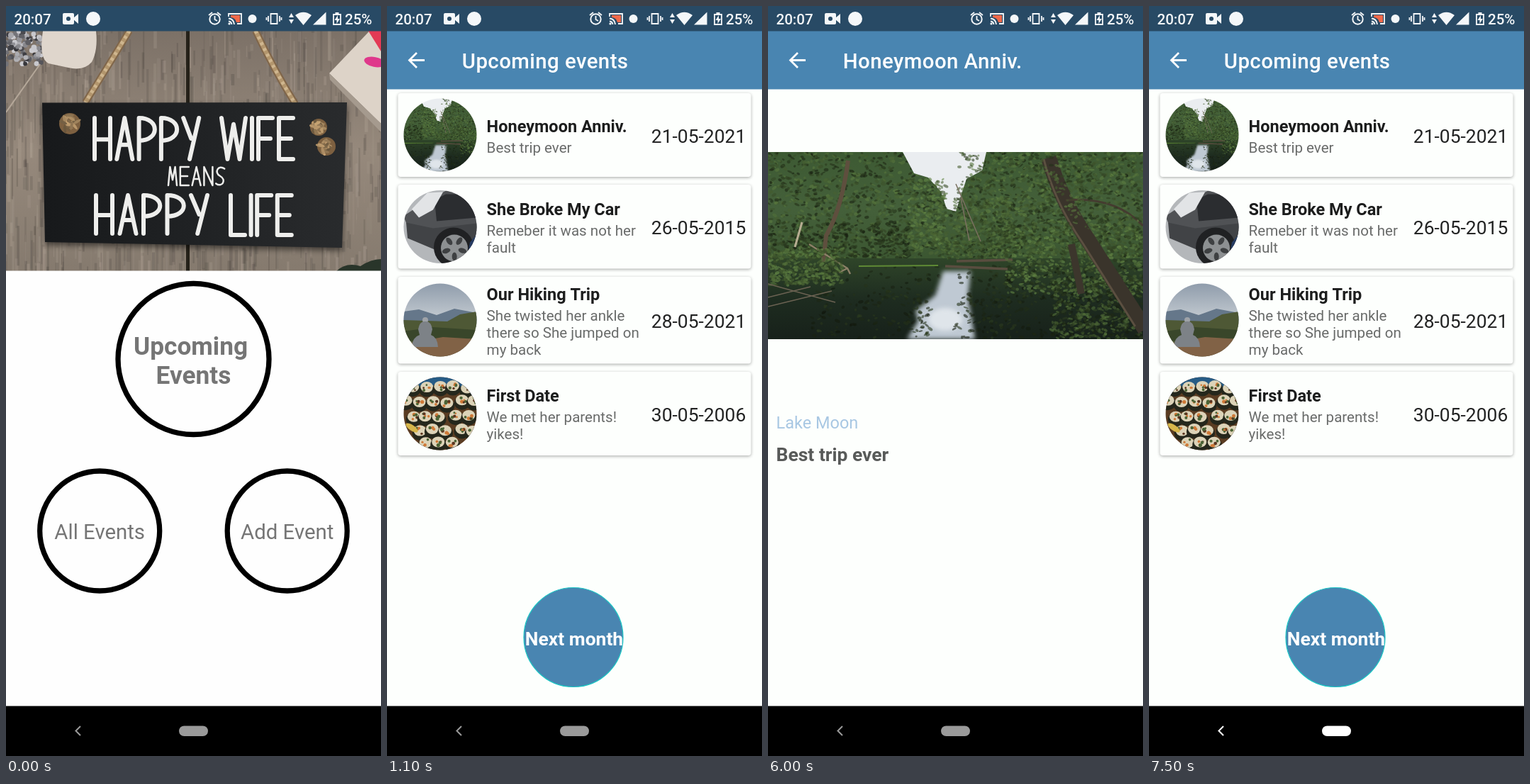
An HTML page with a canvas for the animation above (8 s loop, 529x1058 px).

```html
<!DOCTYPE html>
<html lang="en">
<head>
<meta charset="utf-8">
<title>Event reminder app</title>
<style>
  html, body { margin: 0; width: 100%; height: 100%; overflow: hidden; background: #fdfffd; }
  canvas { display: block; width: 529px; height: 1058px; }
</style>
</head>
<body>
<canvas id="stage" width="529" height="1058"></canvas>
<script>
const W = 529, H = 1058, LOOP = 8000, TAU = Math.PI * 2;
const DP = W / 360;
const BLUE = '#4985b1', PAPER = '#fdfffd';
const stage = document.getElementById('stage').getContext('2d');

function layer(w, h, draw) {
  const canvas = document.createElement('canvas');
  canvas.width = w;
  canvas.height = h;
  draw(canvas.getContext('2d'));
  return canvas;
}

function seeded(seed) {
  return (lo = 0, hi = 1) => {
    seed = (seed * 16807) % 2147483647;
    return lo + (hi - lo) * seed / 2147483647;
  };
}

function text(c, str, x, y, sp, color, weight = 400, align = 'left') {
  c.font = `${weight} ${sp * DP}px Roboto, sans-serif`;
  c.textAlign = align;
  c.fillStyle = color;
  c.fillText(str, x, y);
}

function rect(c, x, y, w, h, color) {
  c.fillStyle = color;
  c.fillRect(x, y, w, h);
}

function round(c, x, y, w, h, r, color) {
  c.fillStyle = color;
  c.beginPath();
  c.roundRect(x, y, w, h, r);
  c.fill();
}

function oval(c, x, y, rx, ry, color, turn = 0) {
  c.fillStyle = color;
  c.beginPath();
  c.ellipse(x, y, rx, ry, turn, 0, TAU);
  c.fill();
}

const disc = (c, x, y, r, color) => oval(c, x, y, r, r, color);

function ring(c, x, y, r, width, color) {
  c.lineWidth = width;
  c.strokeStyle = color;
  c.beginPath();
  c.arc(x, y, r, 0, TAU);
  c.stroke();
}

function shape(c, d, color) {
  c.fillStyle = color;
  c.fill(new Path2D(d));
}

function line(c, d, width, color) {
  c.lineWidth = width;
  c.strokeStyle = color;
  c.stroke(new Path2D(d));
}

function gradient(c, y0, y1, ...colors) {
  const g = c.createLinearGradient(0, y0, 0, y1);
  colors.forEach((color, i) => g.addColorStop(i / (colors.length - 1), color));
  return g;
}

// Brush lettering on the slate, each glyph in a unit box
const GLYPHS = {
  H: 'M0 0V1M1 0V1M0 .52H1', A: 'M0 1L.5 0L1 1M.2 .65H.8', P: 'M0 1V0C1.35 0 1.35 .55 0 .55',
  Y: 'M0 0L.5 .5M1 0L.4 1', W: 'M0 0L.25 1L.5 .15L.75 1L1 0', I: 'M0 0V1',
  F: 'M1 0H0V1M0 .5H.85', E: 'M1 0H0V1H1M0 .5H.85', L: 'M0 0V1H1',
  M: 'M0 1L.2 0L.5 .7L.8 0L1 1', N: 'M0 1V0L1 1V0', S: 'M1 .1C.3-.15-.3 .3 .5 .5S.7 1.15 0 .9'
};

function lettering(c, word, x, y, w, h, gap, width) {
  c.lineCap = c.lineJoin = 'round';
  for (const ch of word) {
    const cell = w * ({ W: 1.7, I: 0 }[ch] ?? 1);
    const path = new Path2D();
    path.addPath(new Path2D(GLYPHS[ch]), new DOMMatrix([cell || 1, 0, 0, h, x, y]));
    c.lineWidth = width;
    c.strokeStyle = '#eeeeec';
    c.stroke(path);
    x += cell + gap;
  }
}

function rope(c, d) {
  line(c, d, 10, '#80664a');
  line(c, d, 6, '#b3966d');
  c.setLineDash([4, 5]);
  line(c, d, 5, '#cfb68f');
  c.setLineDash([]);
}

function knot(c, x, y, r, rnd) {
  disc(c, x, y, r, '#7d6040');
  for (let i = 0; i < 22; i++) {
    const a = rnd(0, TAU), d = rnd(0, r * .8), tone = rnd(105, 205);
    oval(c, x + Math.cos(a) * d, y + Math.sin(a) * d, r * .4, 2, `rgb(${tone},${tone * .82},${tone * .58})`, a * 2);
  }
}

function signPhoto(c) {
  const rnd = seeded(11);
  rect(c, 0, 35, W, 339, gradient(c, 35, 374, '#7c7167', '#96897c', '#857a6e'));
  for (let i = 0; i < 900; i++) {
    const tone = rnd() < .5 ? rnd(45, 90) : rnd(150, 205);
    rect(c, rnd(-10, W), rnd(20, 370), rnd(1, 5), rnd(8, 70), `rgba(${tone},${tone * .93},${tone * .86},.2)`);
  }
  rect(c, 254, 35, 5, 339, '#252119');

  for (let i = 0; i < 120; i++) {
    const tone = rnd(50, 210);
    disc(c, rnd(-4, 50), rnd(30, 82), rnd(2, 4), `rgb(${tone},${tone},${tone + 5})`);
  }
  shape(c, 'M52 35H127Q130 62 121 79Q110 92 88 87L60 81Q46 74 52 35Z', '#dfd6cc');
  line(c, 'M48 82L0 150', 2, '#b5a89a');
  shape(c, 'M456 95L513 35H529V166Z', '#ddd3c8');
  shape(c, 'M456 95L529 166V178L457 104Z', '#a59a8e');
  shape(c, 'M511 35H529V64Z', '#e33a55');
  oval(c, 520, 79, 15, 7, '#df388b', .2);

  rope(c, 'M174 35Q150 75 112 136');
  rope(c, 'M352 35Q378 90 408 138');
  const slate = c.createLinearGradient(51, 0, 481, 0);
  slate.addColorStop(0, '#17191b');
  slate.addColorStop(1, '#292b2d');
  c.save();
  c.shadowColor = '#0008';
  c.shadowBlur = 8;
  c.shadowOffsetY = 4;
  shape(c, 'M51 136.500L481 136L474 341L55 333Z', slate);
  c.restore();
  knot(c, 90, 166, 15, rnd);
  knot(c, 441, 171, 12, rnd);
  knot(c, 452, 198, 13, rnd);

  lettering(c, 'HAPPY', 125, 158, 22, 58, 9.3, 6);
  lettering(c, 'WIFE', 304, 158, 20, 58, 9, 6);
  lettering(c, 'MEANS', 229, 227, 12, 26, 4.8, 2.5);
  lettering(c, 'HAPPY', 127, 267, 23, 54, 10.5, 6);
  lettering(c, 'LIFE', 317, 267, 20, 56, 8.6, 6);
  shape(c, 'M466 374Q480 361 500 367Q515 357 529 357V374Z', '#29352a');
}

const lake = layer(W, 264, c => {
  const rnd = seeded(5);
  const leaves = (n, x0, x1, y0, y1, dark, light, size = 4) => {
    for (let i = 0; i < n; i++) {
      const g = rnd(dark, light);
      oval(c, rnd(x0, x1), rnd(y0, y1), rnd(1.5, size), rnd(1, size * .6),
        `rgba(${g * .74},${g},${g * .52},.6)`, rnd(-.7, .7));
    }
  };
  // Woods and sky
  rect(c, 0, 0, W, 160, gradient(c, 0, 160, '#3d5a33', '#44603a', '#3a5530'));
  leaves(2400, 0, W, 0, 150, 28, 125);
  shape(c, 'M190 0H308L302 26L280 38L272 62L265 84L252 80L244 56L226 36L206 30Z', '#eaedf0');
  leaves(260, 198, 252, 38, 135, 70, 140);
  leaves(70, 268, 320, 0, 60, 50, 120);
  leaves(260, 262, 345, 65, 135, 60, 130);
  leaves(260, 0, 200, 100, 150, 22, 75);

  // Water with the mirrored trees and sky
  rect(c, 0, 150, W, 114, gradient(c, 150, 264, '#2f4529', '#1e2c20', '#17211a'));
  leaves(500, 60, W, 160, 264, 22, 62);
  c.save();
  c.filter = 'blur(3px)';
  shape(c, 'M247 168L286 168L282 205L292 264H196L212 238L208 224L236 202Z', '#bfc9d3');
  oval(c, 250, 236, 24, 16, '#dfe5ea');
  c.restore();
  leaves(90, 262, 345, 168, 262, 25, 60);
  leaves(40, 192, 230, 205, 262, 25, 60);

  line(c, 'M113 12Q104 80 82 118L78 155', 6, '#5e4f3e');
  line(c, 'M48 99L38 134', 3, '#b7ad92');
  line(c, 'M58 130L112 164L116 172M112 164L100 170', 2.5, '#8c8068');
  line(c, 'M128 161L240 160', 2, '#5f8a35');
  line(c, 'M250 161L338 165M266 154L345 152', 3.5, '#594d3f');
  leaves(160, 245, 340, 126, 150, 60, 120, 3);
  line(c, 'M265 45L300 126M272 65L284 125', 1.5, '#7a7060');
  leaves(450, 0, 105, 136, 188, 60, 140);
  line(c, 'M0 186Q50 200 95 212M0 218L90 196M0 205L60 190', 1.5, '#6b6252');

  // Near bank and the leaning trunk
  leaves(900, 335, W, 105, 200, 50, 145);
  leaves(500, 400, W, 180, 264, 30, 125);
  line(c, 'M428 130L442 200', 10, '#3c362c');
  line(c, 'M396 8Q412 66 452 125L532 250', 22, '#3a342b');
  line(c, 'M389 10Q404 70 443 127L518 246', 3, '#5b4f40');
  line(c, 'M420 68Q490 62 529 104', 3, '#453c30');
  leaves(500, 320, W, 0, 110, 45, 135);
});

// Round pictures, drawn around their own centre
function lakeThumb(c) {
  c.drawImage(lake, 132, 0, 264, 264, -52, -52, 104, 104);
}

function carThumb(c) {
  rect(c, -52, -52, 104, 104, '#b4b7ba');
  shape(c, 'M-52 -15L-20 -36L10 -52H52V18L-10 26L-40 12Z', '#505255');
  shape(c, 'M-8 -38L8 -46H52V-13L-5 -8Z', '#2b2d30');
  shape(c, 'M-40 -25L-18 -48L4 -49L-10 -24L-30 -13Z', '#e2e4e6');
  shape(c, 'M-48 -6L-10 2L52 -5V26L-8 32L-46 16Z', '#414346');
  disc(c, 19, 29, 28, '#202123');
  disc(c, 20, 30, 19, '#8d9092');
  for (let i = 0; i < 5; i++) {
    const a = i * TAU / 5 + .3;
    oval(c, 20 + Math.cos(a) * 12, 30 + Math.sin(a) * 12, 6, 3.5, '#3e4042', a);
  }
  shape(c, 'M42 22L52 10V52H36Z', '#263c63');
}

function hikeThumb(c) {
  rect(c, -52, -52, 104, 52, gradient(c, -52, 0, '#8f9cab', '#c5ccd2'));
  shape(c, 'M-52 -12L-30 -15L-5 -7L20 -16L52 -10V10H-52Z', '#65778a');
  shape(c, 'M-52 0L10 2L28 -8L52 -12V52H-52Z', '#4e5835');
  shape(c, 'M-52 16L-10 10L52 14V26L-52 30Z', '#39462a');
  shape(c, 'M-52 34L4 24L52 27V52H-52Z', '#816246');
  disc(c, -21, 0, 4, '#9fa3a8');
  shape(c, 'M-31 13Q-29 1 -21 2Q-13 1 -11 13L-13 21Q-4 24 -3 38H-40Q-39 24 -29 21Z', '#7d8287');
}

function sushiThumb(c) {
  const rnd = seeded(23);
  rect(c, -52, -52, 104, 104, '#5a3c22');
  shape(c, 'M-52 -52H52V-20Q0 -55 -52 -20Z', '#275c86');
  for (let row = -2; row <= 2; row++) {
    for (let col = -3; col <= 3; col++) {
      const x = col * 19 + (row & 1) * 9 + rnd(-3, 3), y = row * 20 + 3 + rnd(-3, 3);
      if (Math.hypot(x, y) > 54) continue;
      oval(c, x, y + 3, 11, 10, '#25271c');
      oval(c, x, y - 1, 9, 7.5, '#dcd3b8');
      for (let i = 0; i < 5; i++)
        disc(c, x + rnd(-5, 5), y + rnd(-5, 4), rnd(1.2, 2.6), ['#cf7937', '#4b6335', '#5b3520'][i % 3]);
    }
  }
  oval(c, -40, 20, 10, 4, '#d6b64b', .6);
}

const EVENTS = [
  { top: 123, height: 118, middle: 182, title: 177.5, name: 'Honeymoon Anniv.', date: '21-05-2021',
    note: ['Best trip ever'], picture: lakeThumb },
  { top: 252, height: 118.5, middle: 311.5, title: 294.5, name: 'She Broke My Car', date: '26-05-2015',
    note: ['Remeber it was not her', 'fault'], picture: carThumb },
  { top: 382, height: 122.5, middle: 443, title: 414.5, name: 'Our Hiking Trip', date: '28-05-2021',
    note: ['She twisted her ankle', 'there so She jumped on', 'my back'], picture: hikeThumb },
  { top: 516, height: 118, middle: 575, title: 558, name: 'First Date', date: '30-05-2006',
    note: ['We met her parents!', 'yikes!'], picture: sushiThumb }
];

function card(c, e) {
  c.save();
  c.shadowColor = '#0005';
  c.shadowBlur = 4;
  c.shadowOffsetY = 1.2;
  round(c, 15.5, e.top, 498, e.height, 4, PAPER);
  c.restore();

  c.save();
  c.translate(75, e.middle);
  c.beginPath();
  c.arc(0, 0, 51.5, 0, TAU);
  c.clip();
  e.picture(c);
  c.restore();

  text(c, e.name, 140.6, e.title, 16, '#1c1d1d', 700);
  e.note.forEach((row, i) => text(c, row, 140.6, e.title + 29 + i * 24.1, 14, '#696b6a'));
  text(c, e.date, 372.8, e.middle + 10.5, 18, '#222323');
}

function appBar(c, title) {
  rect(c, 0, 0, W, H, PAPER);
  rect(c, 0, 35, W, 82.5, BLUE);
  line(c, 'M53 76.5H32M42 66L31.5 76.5L42 87', 2.8, '#fff');
  c.letterSpacing = '0.43px';
  text(c, title, 105.8, 87.5, 20, '#fff', 500);
  c.letterSpacing = '0px';
}

const home = layer(W, H, c => {
  rect(c, 0, 0, W, H, '#fefefe');
  signPhoto(c);
  rect(c, 0, 373.5, W, 620, '#fefefe');
  ring(c, 264.5, 498, 106.5, 7.3, '#000');
  ring(c, 132.2, 740.5, 84.5, 7.3, '#000');
  ring(c, 396.7, 740.5, 84.5, 7.3, '#000');
  const grey = '#757575';
  text(c, 'Upcoming', 260.5, 491.5, 24, grey, 700, 'center');
  text(c, 'Events', 264.5, 532.8, 24, grey, 700, 'center');
  text(c, 'All Events', 132.2, 752, 20, grey, 400, 'center');
  text(c, 'Add Event', 396.7, 752, 20, grey, 400, 'center');
});

const list = layer(W, H, c => {
  appBar(c, 'Upcoming events');
  EVENTS.forEach(e => card(c, e));
  disc(c, 263, 890.5, 70, BLUE);
  ring(c, 263, 890.5, 70, 1.2, '#19c6c4');
  text(c, 'Next month', 264, 902, 18, '#fff', 700, 'center');
});

const detail = layer(W, H, c => {
  appBar(c, 'Honeymoon Anniv.');
  c.drawImage(lake, 0, 206);
  text(c, 'Lake Moon', 11.6, 595.5, 16, '#a8c7e3');
  text(c, 'Best trip ever', 11.6, 642, 18, '#585a59', 700);
});

const statusBar = layer(W, 36, c => {
  const ink = '#f4f7f9', bar = '#284a65';
  rect(c, 0, 0, W, 35.5, bar);
  text(c, '20:07', 11.5, 25.5, 14, ink, 500);
  text(c, '25%', 478, 25.5, 14, ink, 500);

  round(c, 80, 10, 16, 16, 2, ink);
  shape(c, 'M95 17L102 11V25L95 19Z', ink);
  disc(c, 88, 18, 3, bar);
  disc(c, 123, 18, 10, ink);

  ring(c, 294.5, 18.5, 7.2, 2, ink);
  line(c, 'M294.5 14V19L298 21M286 13L291 9M303 13L298 9', 1.8, ink);
  shape(c, 'M317 13H330V23H325Q324 17 317 16Z', '#f0694a');
  line(c, 'M314 15V11H332V25H326M314 17.5Q321 18 322 26M314 21.5Q318 22 318.5 26', 1.8, ink);
  disc(c, 315, 25, 1.6, ink);
  disc(c, 347.5, 18, 6, ink);
  line(c, 'M373.5 11H382.5V25H373.5ZM370 14V22M386 14V22M367.5 16V20M388.5 16V20', 1.8, ink);
  shape(c, 'M399 16L402.5 10L406 16ZM399 19L402.5 25L406 19Z', ink);
  shape(c, 'M408 13Q419.5 4.5 431 13L419.5 27Z', ink);
  shape(c, 'M433 26.5L451.5 8.5V26.5Z', ink);
  line(c, 'M462 12H472V26H462Z', 1.8, ink);
  rect(c, 464.5, 9, 5, 3, ink);
  shape(c, 'M468 13L463.5 20H466.5V25L471 18H468Z', ink);
});

const clamp = v => Math.max(0, Math.min(1, v));

function navBar(t) {
  rect(stage, 0, 987.5, W, 71, '#000');
  const press = t < 6600 ? 0 : Math.min(clamp((t - 6500) / 200), clamp((7200 - t) / 400));
  stage.globalAlpha = press;
  round(stage, 31, 988, 142, 70, 35, '#1f211f');
  stage.globalAlpha = 1;
  const tone = Math.round(154 + 101 * clamp((t - 6500) / 700));
  const color = `rgb(${tone},${tone},${tone})`;
  line(stage, 'M105 1016L98.5 1022.5L105 1029', 2, color);
  round(stage, 244, 1015.5, 41, 14.5, 7.25, color);
}

// [start of the change, screen that comes in]
const CHANGES = [[1000, list], [4400, detail], [6800, list]];

function frame(now) {
  const t = Math.floor((now % LOOP) / 100) * 100;
  stage.drawImage(home, 0, 0);
  for (const [start, screen] of CHANGES) {
    stage.globalAlpha = clamp((t - start + 100) / 200);
    stage.drawImage(screen, 0, 0);
  }
  stage.globalAlpha = 1;
  stage.drawImage(statusBar, 0, 0);
  navBar(t);
  requestAnimationFrame(frame);
}
requestAnimationFrame(frame);
</script>
</body>
</html>
```
